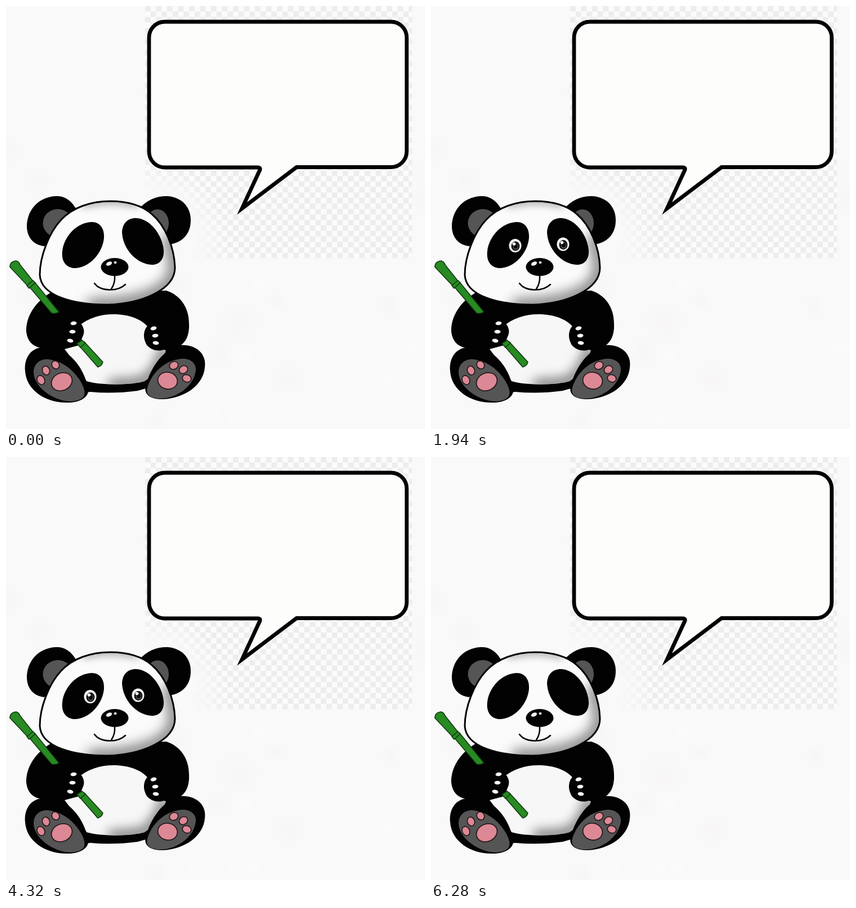
Write an HTML page with a canvas that moves like this. It is 744 by 752 pixels and loops after 6380 ms.

```html
<!DOCTYPE html>
<html lang="en">
<head>
<meta charset="utf-8">
<title>Blinking panda</title>
<style>
html, body { margin: 0; width: 100%; height: 100%; overflow: hidden; background: #faf9f9; }
canvas { display: block; width: 744px; height: 752px; }
</style>
</head>
<body>
<canvas id="stage" width="744" height="752"></canvas>
<script>
const W = 744, H = 752, LOOP = 6380;
const OPEN_SPANS = [[400, 2240], [4080, 6000]];
const INK = '#020202', SOLE = '#555', PINK = '#dd8895', GREEN = '#278a22';
const SOFT = 'blur(0.7px)';
const screen = document.getElementById('stage').getContext('2d');

function layer() {
  const c = document.createElement('canvas');
  c.width = W;
  c.height = H;
  return c.getContext('2d');
}

function seeded(seed) {
  return () => (seed = (seed * 16807) % 2147483647) / 2147483647;
}

function paint(g, path, fill, stroke, width) {
  if (fill) {
    g.fillStyle = fill;
    g.fill(path);
  }
  if (stroke) {
    g.strokeStyle = stroke;
    g.lineWidth = width;
    g.stroke(path);
  }
}

function oval(g, x, y, rx, ry, deg, fill, stroke, width) {
  const p = new Path2D();
  p.ellipse(x, y, rx, ry, deg * Math.PI / 180, 0, Math.PI * 2);
  paint(g, p, fill, stroke, width);
}

function shape(g, d, fill, stroke, width) {
  paint(g, new Path2D(d), fill, stroke, width);
}

function radial(g, x, y, r0, r1, ...stops) {
  const grad = g.createRadialGradient(x, y, r0, x, y, r1);
  stops.forEach(([at, color]) => grad.addColorStop(at, color));
  return grad;
}

// Soft shadow along an edge, kept inside the given outline
function shadeInside(g, outline, edge, color, width, blur) {
  g.save();
  g.clip(new Path2D(outline));
  g.filter = `blur(${blur}px)`;
  g.lineCap = 'round';
  shape(g, edge, null, color, width);
  g.restore();
}

function drawPaper(g) {
  g.fillStyle = '#faf9f9';
  g.fillRect(0, 0, W, H);
  const rnd = seeded(71);
  for (let i = 0; i < 46; i++) {
    const x = rnd() * W, y = rnd() * H, r = 8 + rnd() * 32;
    const tint = i % 2 ? '255,255,253' : '242,238,238';
    oval(g, x, y, r, r, 0, radial(g, x, y, 0, r, [0, `rgba(${tint},.3)`], [1, `rgba(${tint},0)`]));
  }
}

function drawChecker(out) {
  const g = layer(), size = 9.75;
  g.beginPath();
  g.rect(247, 0, 474, 449);
  g.clip();
  g.fillStyle = '#fbfbfb';
  g.fillRect(247, 0, 474, 449);
  g.fillStyle = '#ededee';
  for (let row = 0; row * size < 449; row++) {
    for (let col = row % 2; col * size < 474; col += 2) {
      g.fillRect(247 + col * size, row * size, size, size);
    }
  }
  g.globalCompositeOperation = 'destination-out';
  g.fillStyle = radial(g, 245, 425, 85, 150, [0, '#000'], [0.3, 'rgba(0,0,0,.85)'], [1, 'rgba(0,0,0,0)']);
  g.fillRect(200, 270, 200, 200);
  out.drawImage(g.canvas, 0, 0);
}

function drawBubble(g) {
  g.lineJoin = 'miter';
  shape(g, `M282 28 H683.5 A28 28 0 0 1 711.5 56 V258.5 A28 28 0 0 1 683.5 286.5
    H516 L419 360 L451 291 Q452 287 447 287 H282
    A28 28 0 0 1 254 259 V56 A28 28 0 0 1 282 28 Z`, '#fdfdfc', INK, 6.8);
}

function drawBamboo(g) {
  g.lineJoin = 'round';
  const edge = '#10370f';
  const stems = [
    'M42 500 L51 491 L94 544 Q87 548 81 546 Z',
    'M7 464 Q7 454 18 453 Q23 454 25 460 L48 489 L38 497 Z',
    'M37 497 L48 488 L52 492 L41 502 Z',
    'M130 604 L139 597 L172 633 Q170 640 163 642 Z',
    'M126 600 L135 594 L141 599 L132 607 Z'
  ];
  stems.forEach(d => shape(g, d, GREEN, edge, 1.6));
}

function drawBody(g) {
  shape(g, `M82 508 C52 525 35 552 36 579 C38 596 47 605 62 608 L80 672
    Q125 690 150 686 Q190 690 234 684 L300 665 L302 607
    C319 602 326 585 325 565 C325 535 309 514 285 506 Z`, INK);
  const belly = `M128 570 C145 555 167 548 191 548 C219 548 242 557 254 573
    L262 608 L284 612 C276 635 264 655 246 667
    C224 674 169 675 143 667 C133 647 117 627 104 610 L130 603 Z`;
  shape(g, belly, '#f7f7f7');
  shadeInside(g, belly, 'M282 612 C272 640 262 656 246 667 Q222 673 190 673', '#7d7d7d', 20, 10);

  // Hands overlap the belly
  shape(g, 'M84 555 Q111 548 130 561 Q143 575 136 588 Q131 607 108 607 Q86 609 72 600 Z', INK);
  shape(g, 'M285 557 Q258 557 248 573 Q241 587 250 603 Q261 615 277 612 L300 603 Z', INK);
}

function drawFeet(g) {
  shape(g, `M62 607 C42 610 32 628 34 649 C36 684 73 707 111 705
    C132 705 146 695 146 684 C142 650 119 619 93 609 Z`, INK);
  shape(g, `M307 603 C337 600 357 618 353 643 C350 674 318 697 279 699
    C256 700 244 690 248 675 C257 643 277 613 307 603 Z`, INK);
  shape(g, `M49 651 C49 636 60 628 73 628 C100 630 122 648 135 672
    C145 693 138 701 115 703 C82 702 49 676 49 651 Z`, SOLE);
  shape(g, `M337 648 C338 634 327 627 313 627 C287 629 266 645 255 668
    C245 688 251 697 274 698 C306 697 334 674 337 648 Z`, SOLE);

  const pads = [
    [99, 668, 19, 15.5, -25], [62, 665, 6.5, 8.5, -28], [71, 648, 6.5, 8, -20], [88, 638, 6.5, 7.5, -35],
    [287, 666, 17.5, 15, 12], [298, 639, 8, 6.8, -25], [315, 646.5, 8, 6.8, -35], [321, 662, 8, 6.5, 20]
  ];
  pads.forEach(p => oval(g, ...p, PINK, '#271b1d', 1.8));
}

function drawClaws(g) {
  [[120, 564, -8], [118, 579, 0], [114, 595, 10], [262, 573, -15], [265, 586, -5], [266, 599, 8]]
    .forEach(([x, y, deg]) => oval(g, x, y, 5.5, 3.3, deg, '#fafafa'));
}

function drawHead(g) {
  shape(g, 'M124 360 C115 344 102 337 88 338 C57 340 37 363 37 393 C38 413 50 425 68 427 L100 390 Z', INK);
  shape(g, 'M236 361 C249 345 267 338 285 338 C311 339 328 356 328 381 C328 406 312 421 290 424 L260 390 Z', INK);
  oval(g, 92, 386, 26.5, 25, 0, SOLE);
  oval(g, 269, 386, 20, 24.5, 0, SOLE);

  const face = `M185 347 C151 347 118 358 98 380 C76 403 60 446 60 478
    C62 516 120 531 180 531 C240 529 300 505 300 465
    C299 430 283 390 259 370 C241 354 214 347 185 347 Z`;
  shape(g, face, '#fbfbfb');
  shadeInside(g, face, 'M155 532 C240 532 300 507 301 465 Q299 440 290 415', '#808080', 24, 11);
  shadeInside(g, face, 'M140 352 Q185 341 230 352', '#a5a5a5', 12, 7);
  shape(g, face, null, INK, 3);

  shape(g, `M152 384 C168 384 175 397 174 412 C172 438 149 466 121 466
    C106 465 98 453 100 436 C103 409 126 385 152 384 Z`, INK);
  shape(g, `M231 377 C255 378 277 405 280 434 C281 450 273 460 259 460
    C232 459 207 432 206 402 C207 386 216 377 231 377 Z`, INK);
  oval(g, 193, 464, 24.5, 16, 0, INK);
  oval(g, 183, 458, 5.5, 3.2, -25, '#f4f4f4');
  oval(g, 194, 456, 2.6, 2.2, 0, '#d5d5d5');
  g.lineCap = 'round';
  shape(g, 'M193 479 Q194 493 187 503', null, INK, 2.5);
  shape(g, 'M157 493 C167 507 197 509 212 495', null, INK, 2.5);
}

function drawEye(g, x, y) {
  oval(g, x, y, 11, 12, 0, '#f7f7f5');
  oval(g, x + 0.5, y + 1, 7.5, 8.5, 0, '#111');
  oval(g, x + 1, y + 2, 4.8, 5.5, 0, '#555');
  oval(g, x + 1, y + 1.5, 3.6, 4, 0, '#080808');
  oval(g, x - 2, y - 3, 2.8, 2.8, 0, '#fff');
}

function buildScene(eyesOpen) {
  const art = layer();
  [drawBubble, drawBody, drawBamboo, drawFeet, drawClaws, drawHead].forEach(draw => draw(art));
  if (eyesOpen) {
    drawEye(art, 149.5, 426);
    drawEye(art, 234.5, 423.5);
  }
  const g = layer();
  drawPaper(g);
  g.filter = SOFT;
  drawChecker(g);
  g.drawImage(art.canvas, 0, 0);
  return g.canvas;
}

const openScene = buildScene(true);
const closedScene = buildScene(false);

function render(now) {
  const t = now % LOOP;
  const open = OPEN_SPANS.some(([from, to]) => t >= from && t < to);
  screen.drawImage(open ? openScene : closedScene, 0, 0);
}

const start = performance.now();
function tick() {
  render(performance.now() - start);
  requestAnimationFrame(tick);
}
tick();
</script>
</body>
</html>
```
